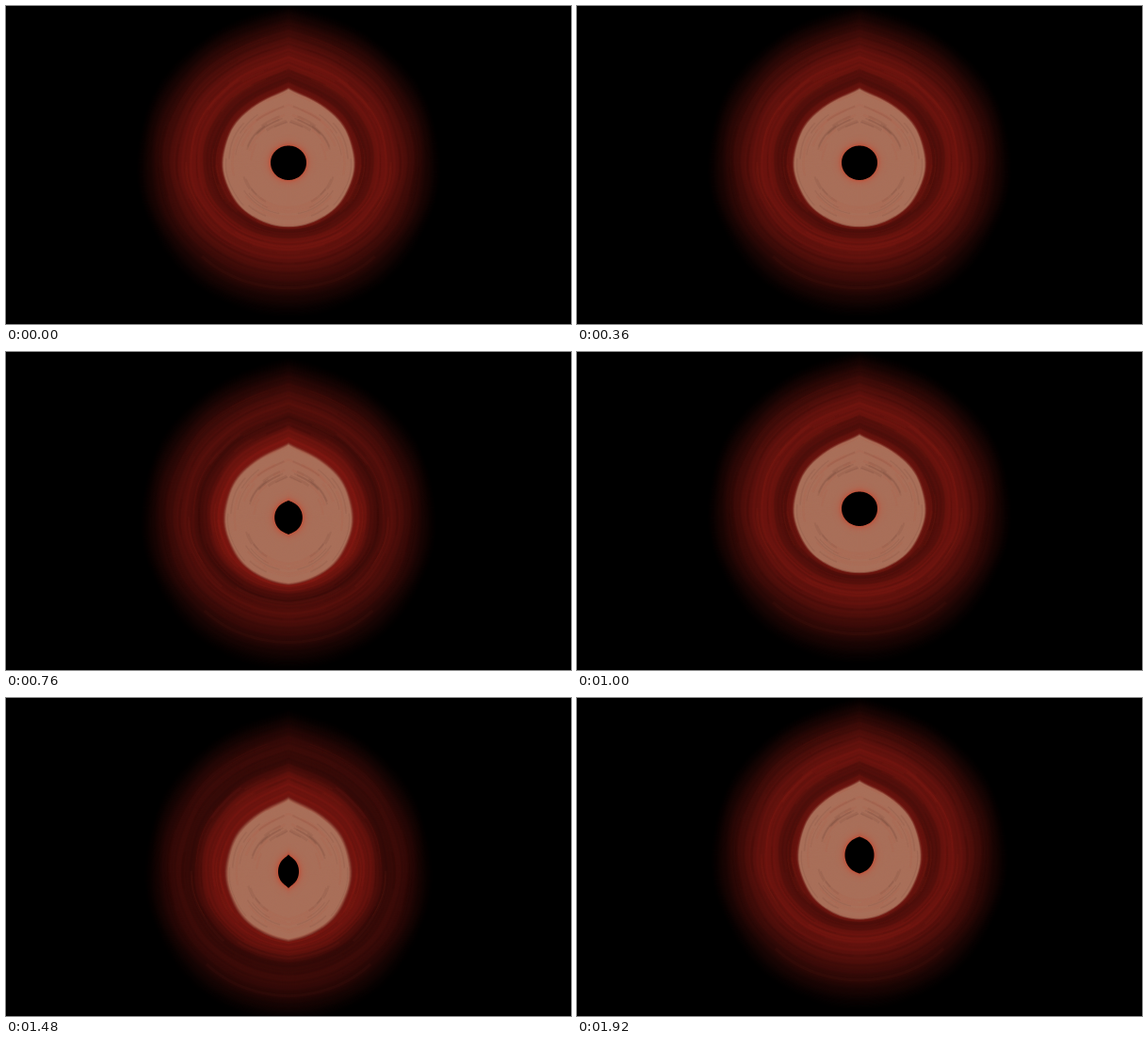
These frames come from a looping animation (600x338 px, 2000 ms). An HTML page with a canvas:

```html
<!DOCTYPE html>
<html lang="en">
<head>
<meta charset="utf-8">
<title>Pulsing red ring</title>
<style>
html, body { margin: 0; width: 100%; height: 100%; overflow: hidden; background: #000; }
canvas { display: block; }
</style>
</head>
<body>
<canvas id="stage" width="600" height="338"></canvas>
<script>
const ctx = document.getElementById('stage').getContext('2d');
const CX = 300, LOOP = 2000, STEPS = 8;
const lerp = (a, b, k) => a + (b - a) * k;
const mix = (p, q, k) => p.map((v, i) => lerp(v, q[i], k));
const clamp = v => Math.min(1, Math.max(0, v));
const bell = (x, width) => Math.exp(-((x / width) ** 2));

// The ring sinks for three steps, springs back wide, then settles slim.
function poseAt(step) {
  const drop = step <= 3 ? (step / 3) ** 1.6 : .25 ** (step - 3);
  const squash = step <= 3 ? -8 * drop : lerp(4, -3.5, clamp((step - 4) / 2));
  const point = Math.max(0, -.4 * squash);
  // Each outline: half width, height up, height down, top tip, bottom tip.
  return {
    drop,
    cy: 166.5 + 18 * drop,
    power: 1 - .05 * Math.max(0, squash),
    hole: [19 + squash, 18 - 3 * drop, 18.5 - 4 * drop, point, point],
    pale: [70 + 1.4 * squash + 8 * drop, 70, 68.5 + 3 * drop, 9, 3 * drop],
    rim: [163 + 1.1 * squash, 160 + 4 * drop, 166 - 4 * drop, 10, 0]
  };
}

// Level 0 is the hole, 1 the edge of the pale disc, 2 the outer rim.
function colourAt({ drop }, s) {
  const f = Math.max(0, s - 1);
  const dip = 1 - .38 * bell(f - lerp(.13, .43, drop), .13);
  const grain = 1 + .04 * Math.sin(s * 61) + .03 * Math.sin(s * 143);
  const red = lerp(130, 112, drop) * (1 - f * f) ** 1.35 * dip * grain;
  const pale = mix([169, 111, 89], [196, 76, 52], Math.exp(-s / .05));
  const soft = .02 + .03 * drop;
  const edge = clamp((s - 1 + soft) / (soft + .02));
  return `rgb(${mix(pale, [red, red * .18, red * .13], edge)})`;
}

function outline(pose, s) {
  const inner = s < 1, f = inner ? s : s - 1;
  const shape = inner ? mix(pose.hole, pose.pale, f) : mix(pose.pale, pose.rim, f);
  if (!inner) shape[2] = lerp(pose.pale[2], pose.rim[2], f ** 1.4);
  return { shape, cy: pose.cy, power: inner ? lerp(pose.power, 1, f) : 1, s };
}

// Angle 0 points up, PI points down; both sides mirror.
function pointAt({ shape: [w, up, down, tip, foot], cy, power, s }, a, side) {
  const c = Math.cos(a), h = Math.abs(c) ** power;
  const rough = 1 + .005 * Math.min(s, 1) * Math.sin(9 * a + s * 12) * Math.sin(a);
  const y = c > 0 ? -up * h : down * h;
  const peak = foot * Math.exp((a - Math.PI) / .22) - tip * Math.exp(-a / .22);
  return [CX + side * w * Math.sin(a) ** power * rough, cy + y * rough + peak];
}

function trace(line, from, to, side, steps = 48) {
  for (let i = 0; i <= steps; i++) ctx.lineTo(...pointAt(line, lerp(from, to, i / steps), side));
}

function fillRing(pose, s, colour) {
  const line = outline(pose, s);
  ctx.beginPath();
  trace(line, 0, Math.PI, 1);
  trace(line, Math.PI, 0, -1);
  ctx.fillStyle = colour;
  ctx.fill();
}

let seed = 17;
const random = () => (seed = seed * 16807 % 2147483647) / 2147483647;
const streaks = Array.from({ length: 80 }, () => {
  const from = random() * 2.7;
  return { s: .4 + random() * 1.35, from, to: Math.min(Math.PI, from + .25 + random() * .7),
    width: .7 + random() * 2.5, light: random() < .4 };
});

function draw(pose) {
  ctx.fillStyle = '#000';
  ctx.fillRect(0, 0, 600, 338);
  for (let i = 200; i >= 0; i--) fillRing(pose, i / 100, colourAt(pose, i / 100));
  for (const { s, from, to, width, light } of streaks) {
    const line = outline(pose, s);
    ctx.lineWidth = width;
    ctx.strokeStyle = light ? 'rgba(190,55,38,.05)' : 'rgba(35,0,0,.06)';
    for (const side of [-1, 1]) {
      ctx.beginPath();
      trace(line, from, to, side, 14);
      ctx.stroke();
    }
  }
  fillRing(pose, 0, '#000');
}

// An eight-step pulse at 24 steps a second, shown on a 40 ms grid.
const start = performance.now();
let shown = -1;
function tick() {
  const slot = Math.floor((performance.now() - start) % LOOP / 40);
  const step = Math.floor(slot * 24 / 25) % STEPS;
  if (step !== shown) draw(poseAt(shown = step));
  requestAnimationFrame(tick);
}
tick();
</script>
</body>
</html>
```
